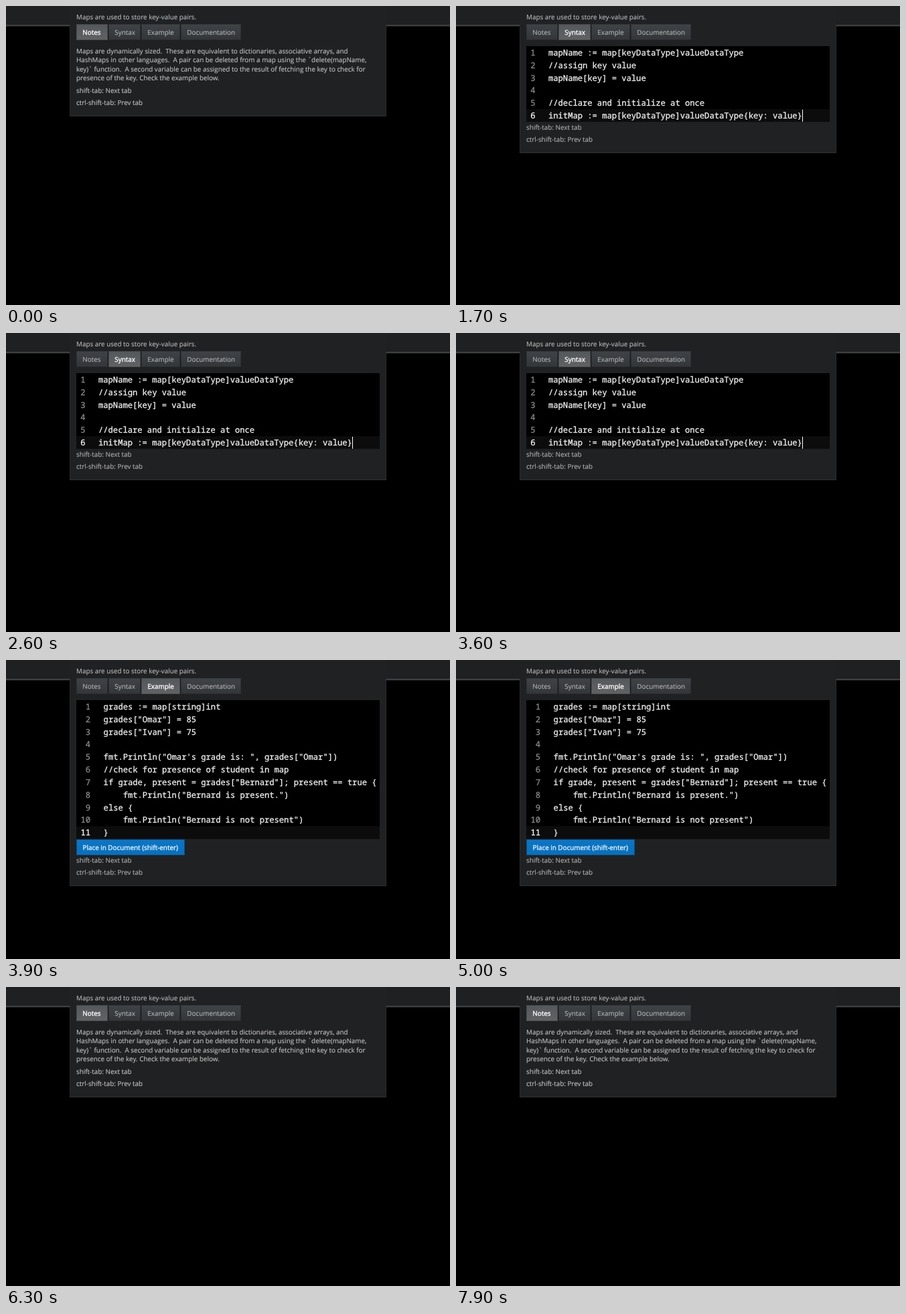
Recreate the animation shown at these times as an HTML page with a canvas. Size 663 by 447 pixels, loop 8 s.

```html
<!DOCTYPE html>
<html lang="en">
<head>
<meta charset="utf-8">
<title>Map notes</title>
<style>
  html, body { margin: 0; width: 100%; height: 100%; overflow: hidden; background: #000; }
  canvas { display: block; }
</style>
</head>
<body>
<canvas id="stage" width="663" height="447"></canvas>
<script>
const ctx = document.getElementById('stage').getContext('2d');
const LOOP = 8000;
const LEFT = 95, RIGHT = 568, PAD = 105;
const UI = '"Open Sans", "Noto Sans", sans-serif';
const MONO = '"Noto Sans Mono", "DejaVu Sans Mono", monospace';
const CODE_TOP = 60, ROW = 18.85, CODE_SIZE = 12.15;

const TABS = [
  { label: 'Notes', x: 105, w: 47 },
  { label: 'Syntax', x: 153, w: 48 },
  { label: 'Example', x: 202, w: 58 },
  { label: 'Documentation', x: 261, w: 90 }
];

const NOTES = [
  'Maps are dynamically sized.  These are equivalent to dictionaries, associative arrays, and',
  'HashMaps in other languages.  A pair can be deleted from a map using the `delete(mapName,',
  'key)` function.  A second variable can be assigned to the result of fetching the key to check for',
  'presence of the key. Check the example below.'
];

const SYNTAX = [
  'mapName := map[keyDataType]valueDataType',
  '//assign key value',
  'mapName[key] = value',
  '',
  '//declare and initialize at once',
  'initMap := map[keyDataType]valueDataType{key: value}'
];

const EXAMPLE = [
  'grades := map[string]int',
  'grades["Omar"] = 85',
  'grades["Ivan"] = 75',
  '',
  'fmt.Println("Omar\'s grade is: ", grades["Omar"])',
  '//check for presence of student in map',
  'if grade, present = grades["Bernard"]; present == true {',
  '    fmt.Println("Bernard is present.")',
  'else {',
  '    fmt.Println("Bernard is not present")',
  '}'
];

// Each view: start time, active tab, baseline of the first hint, text colour
const VIEWS = [
  { at: 0, tab: 0, hint: 129.5, ink: '#c0c0c0', body: drawNotes },
  { at: 1700, tab: 1, hint: 184.5, ink: '#aeaeae', body: drawSyntax },
  { at: 3700, tab: 2, hint: 303, ink: '#aeaeae', body: drawExample },
  { at: 5200, tab: 3, hint: 93.5, ink: '#b4b4b4', body: drawDocs },
  { at: 6300, tab: 0, hint: 129.5, ink: '#c0c0c0', body: drawNotes }
];

function rect(x, y, w, h, fill) {
  ctx.fillStyle = fill;
  ctx.fillRect(x, y, w, h);
}

function shade(y, h, top, bottom) {
  const g = ctx.createLinearGradient(0, y, 0, y + h);
  g.addColorStop(0, top);
  g.addColorStop(1, bottom);
  return g;
}

function outline(x, y, w, h, color) {
  ctx.strokeStyle = color;
  ctx.lineWidth = 1;
  ctx.strokeRect(x + 0.5, y + 0.5, w - 1, h - 1);
}

function text(str, x, y, color, { size = 9.9, family = UI, heavy = 0.15 } = {}) {
  ctx.font = `${size}px ${family}`;
  ctx.fillStyle = color;
  ctx.fillText(str, x, y);
  ctx.strokeStyle = color;
  ctx.lineWidth = heavy;
  ctx.strokeText(str, x, y);
}

function drawBar() {
  rect(0, 0, 663, 447, '#000');
  rect(0, 0, 663, 28, '#1f2021');
  rect(0, 28, 663, 2, '#3f4041');
  rect(0, 30, 663, 1, '#141515');
}

function drawPanel(bottom) {
  rect(LEFT, 0, RIGHT - LEFT, bottom, '#202123');
  rect(LEFT, 28, 1, bottom - 28, '#2b2c2e');
  rect(RIGHT - 1, 28, 1, bottom - 28, '#2b2c2e');
  rect(LEFT, bottom - 1, RIGHT - LEFT, 1, '#2f3032');
}

function drawTabs(active) {
  rect(PAD, 27, 246, 24, '#191a1b');
  TABS.forEach(({ label, x, w }, i) => {
    const on = i === active;
    rect(x, 27, w, 24, on ? shade(27, 24, '#55585b', '#606264') : shade(27, 24, '#3f4347', '#333639'));
    outline(x, 27, w, 24, 'rgba(0,0,0,0.2)');
    text(label, x + 9.3, 43, on ? '#fff' : '#b2b2b2', { heavy: on ? 0.35 : 0.15 });
  });
}

function drawCode(lines, x) {
  const style = { size: CODE_SIZE, family: MONO, heavy: 0.3 };
  const last = lines.length - 1;
  rect(PAD, CODE_TOP, 453, lines.length * ROW, '#000');
  rect(PAD, CODE_TOP + last * ROW, 453, ROW, '#0c0c0c');
  ctx.font = `${CODE_SIZE}px ${MONO}`;
  const step = ctx.measureText('0').width;
  lines.forEach((line, i) => {
    const y = CODE_TOP + i * ROW + 13.8;
    const num = String(i + 1);
    text(num, x - 19.5 - num.length * step, y, i === last ? '#fff' : '#8c8c8c', style);
    text(line, x, y, '#f4f4f4', style);
  });
}

function drawNotes(ink) {
  NOTES.forEach((line, i) => text(line, PAD, 71 + i * 13.4, ink));
}

function drawSyntax() {
  drawCode(SYNTAX, 138);
  rect(517, 155, 1, 18, '#fff');
}

function drawExample() {
  drawCode(EXAMPLE, 145.6);
  rect(PAD, 268, 162, 24, shade(268, 24, '#0b76c6', '#0870bd'));
  outline(PAD, 268, 162, 24, 'rgba(0,0,0,0.3)');
  text('Place in Document (shift-enter)', 114.5, 284, '#fff', { heavy: 0.25 });
}

function drawDocs(ink) {
  text('1.', 133, 71, ink);
  text('The Go Programming Language Specification - The Go Programming Language',
    143, 71, '#f2f2f2', { size: 10, heavy: 0.3 });
}

function draw(time) {
  const view = VIEWS.findLast(v => time >= v.at);
  drawBar();
  drawPanel(Math.round(view.hint + 35));
  text('Maps are used to store key-value pairs.', PAD, 20, '#b6b6b6');
  drawTabs(view.tab);
  view.body(view.ink);
  text('shift-tab: Next tab', PAD, view.hint, view.ink);
  text('ctrl-shift-tab: Prev tab', PAD, view.hint + 18, view.ink);
}

ctx.textRendering = 'geometricPrecision';
const start = performance.now();

function tick() {
  draw((performance.now() - start) % LOOP);
  requestAnimationFrame(tick);
}
tick();
</script>
</body>
</html>
```
